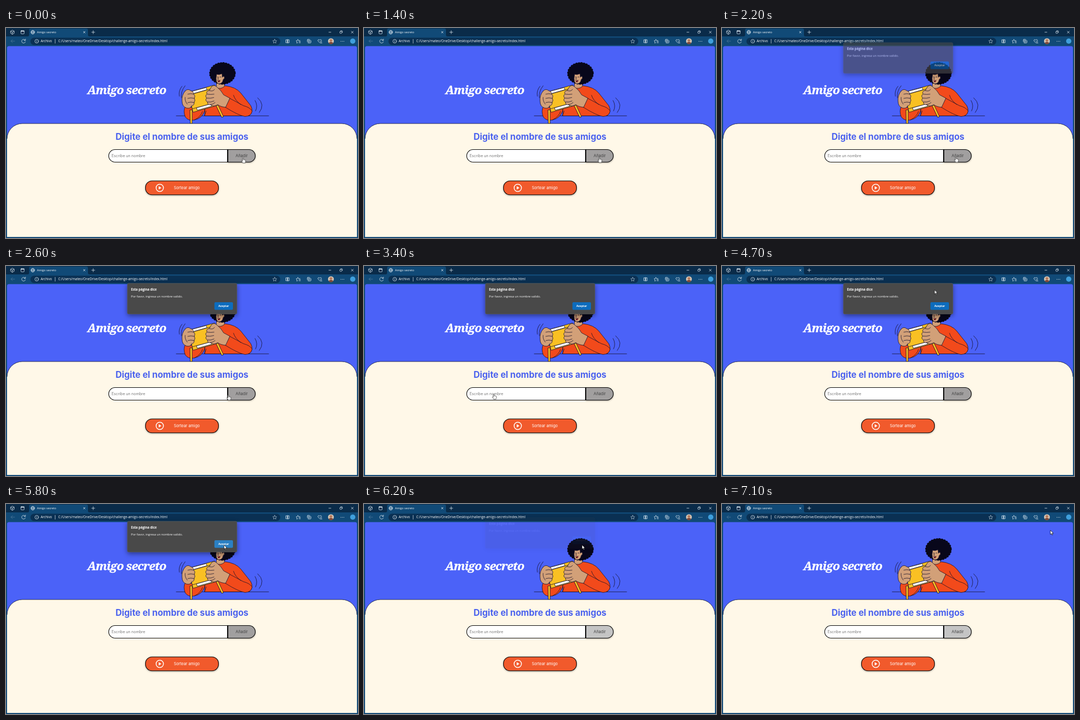
An HTML page that plays this animation: 670x400 px, repeating every 8.2 s.

```html
<!DOCTYPE html>
<html lang="es">
<head>
<meta charset="utf-8">
<title>Amigo secreto</title>
<style>
html, body { margin: 0; width: 100%; height: 100%; overflow: hidden; background: #114a77; }
svg { display: block; width: 670px; height: 400px; }
text { font-family: Inter, sans-serif; }
.ui, .ui text { font-family: "Open Sans", "Noto Sans", sans-serif; fill: #fff; }
.mid { text-anchor: middle; }
.icon { fill: none; stroke: #dbe6ef; stroke-width: .8; stroke-linecap: round; stroke-linejoin: round; }
.ink { stroke: #17122b; stroke-width: .8; stroke-linejoin: round; stroke-linecap: round; }
.line { fill: none; }
.red { fill: #f24a1b; }
.gold { fill: #f9c023; }
.skin { fill: #d2a078; }
.frame { stroke: #000; stroke-width: 1.1; }
.shade { filter: drop-shadow(0 1.500px 1.500px rgba(0, 0, 0, .35)); }

#dialog, #cursor, #hand, #arrow, #add, #ok { animation: 8.2s step-end infinite; }
#dialog { animation-name: dialog; }
#cursor { animation-name: travel; }
#hand { animation-name: hand; }
#arrow { animation-name: arrow; }
#add { fill: #a19f9f; animation-name: add; }
#ok { fill: #0d6cbd; animation-name: ok; }

@keyframes dialog {
  0% { opacity: 0; transform: translateY(-8px); }
  26.82% { opacity: .62; transform: translateY(-5.3px); }
  28.04% { opacity: .92; transform: translateY(-1.2px); }
  29.26%, 73.17% { opacity: 1; transform: none; }
  74.39% { opacity: .45; transform: translateY(-4px); }
  75.6% { opacity: .08; transform: translateY(-7.2px); }
  76.82%, 100% { opacity: 0; transform: translateY(-8px); }
}
@keyframes travel {
  0% { transform: translate(451px, 246.5px); }
  9.75% { transform: translate(451px, 246.5px); animation-timing-function: steps(11); }
  23.17% { transform: translate(445px, 245px); }
  30.48% { transform: translate(445px, 245px); animation-timing-function: steps(9); }
  41.46% { transform: translate(247px, 243px); animation-timing-function: steps(5); }
  47.56% { transform: translate(345px, 292px); animation-timing-function: steps(3); }
  51.21% { transform: translate(289px, 243px); }
  52.43% { transform: translate(304px, 246px); }
  53.65% { transform: translate(304px, 246px); animation-timing-function: steps(3); }
  57.31% { transform: translate(404.5px, 45.5px); animation-timing-function: steps(6); }
  64.63% { transform: translate(415px, 78px); }
  76.82% { transform: translate(415px, 78px); animation-timing-function: steps(3); }
  80.48% { transform: translate(392px, 112px); animation-timing-function: steps(5); }
  86.58%, 100% { transform: translate(625px, 50px); }
}
@keyframes hand { 0% { opacity: 1; } 56.09%, 100% { opacity: 0; } }
@keyframes arrow { 0% { opacity: 0; } 56.09%, 100% { opacity: 1; } }
@keyframes add { 0% { fill: #a19f9f; } 74.39%, 100% { fill: #c4c4c4; } }
@keyframes ok { 0% { fill: #0d6cbd; } 63.41%, 100% { fill: #2b80c3; } }
</style>
</head>
<body>
<svg viewBox="0 0 670 400">
  <!-- browser -->
  <rect width="670" height="400" fill="#114a77"/>
  <rect width="670" height="16" fill="#0a2b49"/>
  <path d="M41 16q3 0 3-3V4q0-3 3-3H153q3 0 3 3v9q0 3 3 3z" fill="#114a77"/>
  <rect x="46.500" y="18.500" width="475.500" height="14" rx="7" fill="#0a3053"/>
  <g class="icon">
    <path d="M9 6l3-2 3.500 2v4L12 12 9 10zM9 6l3 2 3.500-2M12 8v4"/>
    <rect x="28.500" y="5" width="6" height="6.200" rx="1"/>
    <path d="M28.500 6h6" stroke-width="1.600"/>
    <circle cx="51" cy="8" r="3.500"/>
    <ellipse cx="51" cy="8" rx="1.600" ry="3.500"/>
    <path d="M47.500 8h7M147.300 6.300l3.400 3.400m0-3.400l-3.400 3.400M163 8h6M166 5v6"/>
    <path d="M614.500 8h4M657.200 6l4 4m0-4l-4 4"/>
    <rect x="635.500" y="6.500" width="3.600" height="3.600" rx=".8"/>
    <path d="M637 5.300h2.500q.8 0 .8.800v2.500"/>
    <path d="M16.500 25H9.500l3-3m-3 3l3 3" opacity=".3"/>
    <path d="M36.700 23.500a3.600 3.600 0 1 0 .2 2.800M37 21v2.700h-2.700"/>
    <circle cx="58.500" cy="25.200" r="3.500"/>
    <path d="M58.500 25v1.800M58.500 23.400v.1M93.500 21.500v7.500" stroke-width=".7"/>
    <path d="M511.500 21.500l1.100 2.500 2.700.3-2 1.800.6 2.700-2.400-1.400-2.400 1.400.6-2.700-2-1.800 2.700-.3z" stroke-width=".6"/>
    <path d="M533 22.500h2.300v5.500H533zM536.700 22.500h2.300v5.500h-2.300zM536 21.500v7.500"/>
    <path d="M555 28l-1.500.8.300-2.700-1.800-1.700 2.500-.4 1-2.500 1.200 2.500h3M557.500 25.800h3M557.500 28h3"/>
    <rect x="573.500" y="21.700" width="5" height="5" rx="1"/>
    <path d="M575 28.500h4q1.500 0 1.500-1.500v-3M576 23v2.500m-1.200-1.200h2.500"/>
    <path d="M597 28l-3-3q-1-2.500 1-3 1.300 0 2 1.200 1-1.700 2.700-1 1.500 1 .3 2.800M597.500 25.500l1.500 1.300 2-1M598 28.500h3.500"/>
    <path d="M637.500 25.300h.1M640.300 25.300h.1M643 25.300h.1" stroke-width="1.200"/>
  </g>
  <circle cx="618.500" cy="25" r="5.600" fill="#cfc1b2"/>
  <path d="M614 28.400q4.500-4 9 0a5.600 5.600 0 0 1-9 0z" fill="#7d4434"/>
  <circle cx="618.500" cy="23.800" r="2.500" fill="#b8795a"/>
  <circle cx="660" cy="25" r="5" fill="#3f9fdc"/>
  <g class="ui">
    <text x="59" y="10" font-size="5.500">Amigo secreto</text>
    <text x="66" y="27.400" font-size="6.200">Archivo</text>
    <text x="99.500" y="27.400" font-size="6.230">C:/Users/mateo/OneDrive/Desktop/challenge-amigo-secreto/index.html</text>
  </g>

  <!-- page -->
  <path d="M2 398V38q0-3.500 3.500-3.500h659q3.500 0 3.500 3.500V398z" fill="#4b62f8"/>
  <text x="229.800" y="126" class="mid" font-size="22.400" font-weight="700" font-style="italic" letter-spacing="-.88" fill="#fff" stroke="#fff" stroke-width=".35" style="font-family:'Noto Serif',serif">Amigo secreto</text>

  <!-- drawing -->
  <g class="ink">
    <path class="line" d="M324 167.300H500"/>
    <path class="red" d="M378 167L380 130Q385 114 400 111.500L417 110Q437 112 447 124L466 148Q472 160 463 167z"/>
    <path class="skin" d="M401 102L400 113Q408 118 416 111L414 98z"/>
    <g fill="#08071b" stroke="#08071b">
      <ellipse cx="412" cy="86.500" rx="22.500" ry="19"/>
      <ellipse cx="412" cy="86.500" rx="22.500" ry="18.700" fill="none" stroke-width="5.500" stroke-dasharray="0 4.700"/>
    </g>
    <path class="skin" d="M401 88Q399 96 400.500 102Q403 108 409 105.500Q413 103 413.500 98Q417 96 415.500 92.500Q413 91 412 94L411 87Q405 90 401 88z"/>
    <path class="line" d="M402 93.500q1-.9 2 0M407 93.500q1.300-1 2.500 0M404.300 94l-1.300 3.600 1.500.2"/>
    <path d="M403 100q2.500 1 4.500-.8-.3 4-2.800 4-1.500-.7-1.700-3.200z" fill="#8e1c20" stroke-width=".5"/>

    <path class="red" d="M341 150Q337 158 341 169Q347 178 359 175Q373 172 378 158L379 137L360 152z"/>
    <path class="line" d="M359 175Q371 169 374 159"/>
    <path class="gold" d="M350.500 156h3.800v26h-3.200zM396 139l3.500-1.200 14.500 31.200-3.200 1z"/>
    <path class="gold" d="M348 122L397 108.500Q404 127 403.500 147L356 160.500Q351 142 348 122z"/>
    <path class="line" d="M350.500 127L399 113.500M354.500 154L403 141"/>
    <path fill="#fff" d="M354.500 120.500L381 113.500 382.500 117.500 356 125zM363 152L390 144.500 391.500 149 364.500 156.500z"/>

    <path class="skin" d="M341 120Q346 115 351 119Q357 121 357.500 126Q361 129 358.500 134Q361 138 358 142Q359 147 353 148.500Q351 154 344 152.500Q335 150 335 139Q334 128 341 120z"/>
    <path class="line" d="M346 126q6-2 11.500 0M346 134q6-2 12.500 0M346 142q6-2 12 0M341 132q-1 7 4 13"/>

    <path class="red" d="M426 134L452 148Q464 151 468.500 158Q467 168 455 168.500Q443 167 417.500 151z"/>
    <path class="line" d="M433 128Q436 138 447 146M378 167L381 158"/>
    <path class="skin" d="M426 134L418 151Q408 150 403 146Q395 151 389 146Q383 147 383.500 141Q378 138 382 133.500Q378 129 382.500 126Q380 120 387 119L391 112Q396 107 401 112Q410 119 414 127z"/>
    <path class="line" d="M383 126q7 1 13 0M382 133.500q7 1 13.500-1M384 141q6 1 12-2M389 146q5-.5 9-4M387 119q6 3 10-2"/>

    <path class="line" d="M330 130Q328 119 335 111M334 133Q332 121 341 110M474 138Q480 148 475 158M479 133Q494 146 482 161"/>
  </g>

  <path d="M2 398V211a29 29 0 0 1 29-29H639a29 29 0 0 1 29 29V398z" fill="#fff8e8"/>
  <path class="line" d="M2 211a29 29 0 0 1 29-29H639a29 29 0 0 1 29 29" stroke="#11142b" stroke-width=".8"/>
  <text x="335" y="212.500" class="mid" font-size="16.650" font-weight="700" fill="#4b62ee">Digite el nombre de sus amigos</text>

  <path class="frame" d="M422 231.500H207.500a12 12 0 0 0 0 24H422z" fill="#fff"/>
  <text x="201" y="245.800" font-size="7.200" fill="#777">Escribe un nombre</text>
  <g class="shade">
    <path id="add" class="frame" d="M422.300 231.500H462.500a12 12 0 0 1 0 24H422.300z"/>
  </g>
  <path d="M422 231v25" stroke="#000" stroke-width="2"/>
  <text x="448.500" y="245.900" class="mid" font-size="7.500" fill="#444">Añadir</text>

  <rect class="frame shade" x="265.500" y="291.300" width="139" height="26.500" rx="12.500" fill="#f15a2c"/>
  <circle cx="292.700" cy="304.500" r="7" fill="none" stroke="#fff" stroke-width="1.500"/>
  <path d="M290.700 301.200v6.600l5-3.300z" fill="#fff"/>
  <text x="344" y="307.200" class="mid" font-size="7.400" fill="#fff">Sortear amigo</text>

  <!-- alert -->
  <g id="dialog" class="ui">
    <rect x="231" y="33" width="208.500" height="58.500" rx="2.500" fill="#494949" stroke="#5e5e5e" stroke-width=".6" style="filter:drop-shadow(0 3px 5px rgba(0,0,0,.45))"/>
    <text x="238" y="46.500" font-size="6.100" font-weight="700">Esta página dice</text>
    <text x="238" y="60" font-size="5.800">Por favor, ingresa un nombre valido.</text>
    <rect id="ok" x="396.700" y="69" width="35.300" height="14.500" rx="2"/>
    <text x="414.300" y="78" class="mid" font-size="5.200" font-weight="700">Aceptar</text>
  </g>

  <g id="cursor" stroke="#000" stroke-width=".7" stroke-linejoin="round" fill="#fff">
    <g id="hand">
      <path transform="translate(0 .8) scale(.86)" d="M-1 .8Q0-.3 1 .8V4Q2 3.300 2.800 4.300 3.800 3.700 4.500 4.800 5.700 4.500 5.900 5.800V8Q5.500 10 4.800 11.500H-.2Q-1.500 9.500-3 7.300-3.200 5.800-2 5.900L-1 7z"/>
    </g>
    <path id="arrow" d="M0 0V8L1.900 6.300 3.200 9.200 4.500 8.600 3.200 5.800H5.800z"/>
  </g>
</svg>
</body>
</html>
```
